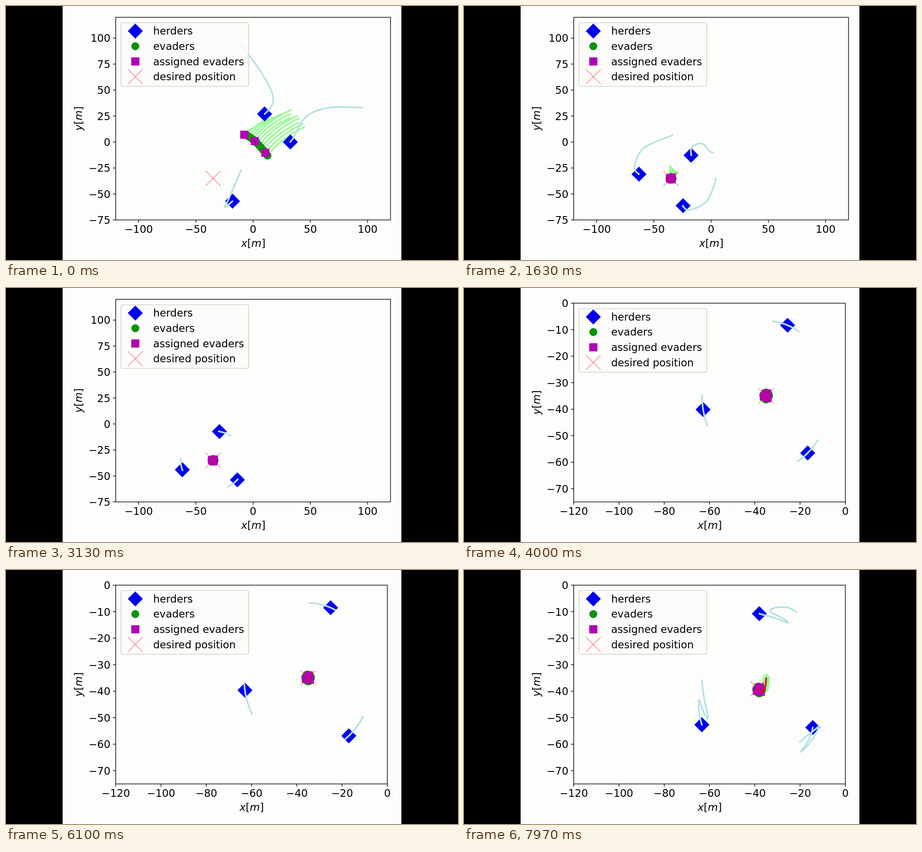
An HTML page with a canvas that plays this animation: 998 by 561 pixels, repeating every 8 s.

```html
<!DOCTYPE html>
<html lang="en">
<head>
<meta charset="utf-8">
<title>Herding</title>
<style>
  html, body { margin: 0; width: 100%; height: 100%; overflow: hidden; background: #000; }
  canvas { display: block; }
</style>
</head>
<body>
<canvas id="stage" width="998" height="561"></canvas>
<script>
const ctx = document.getElementById('stage').getContext('2d');
const LOOP = 8000, STEP = 100 / 3, TRAIL = 1000;
const SETTLED = 1630, ZOOM_AT = 3670, GOAL_MOVES = 7100;
const PAPER = '#fdfdfb', BLUE = '#0000f0', GREEN = '#0a930a', PURPLE = '#b000b4';
const FONT = '22.9px "DejaVu Sans", sans-serif';
const LEFT = 242.3, BOTTOM = 472.5;

const range = (a, b, step) => Array.from({ length: (b - a) / step + 1 }, (_, i) => a + i * step);
const mix = (a, b, u) => [a[0] + (b[0] - a[0]) * u, a[1] + (b[1] - a[1]) * u];
const clamp = u => Math.min(1, Math.max(0, u));
const wave = (t, period) => Math.sin(2 * Math.PI * t / period);
const polar = (c, r, a) => [c[0] + r * Math.cos(a), c[1] + r * Math.sin(a)];

// Axes: frame edges, data limits and ticks, with a map from data to pixels.
function makeAxes(right, top, xMax, yMax, xTicks, yTicks) {
  const sx = (right - LEFT) / (xMax + 120), sy = (BOTTOM - top) / (yMax + 75);
  return { right, top, xTicks, yTicks, px: ([x, y]) => [LEFT + (x + 120) * sx, BOTTOM - (y + 75) * sy] };
}
const wide = makeAxes(849, 25, 120, 120, range(-100, 100, 50), range(-75, 100, 25));
const near = makeAxes(842, 33.5, 0, 0, range(-120, 0, 20), range(-70, 0, 10));

// The goal rests, then hooks down and to the left.
function goal(t) {
  const u = clamp((t - GOAL_MOVES) / (LOOP - STEP - GOAL_MOVES));
  return [-35 - 3.6 * u * u, -35 - 5.2 * Math.sin(2.25 * u)];
}

// Smooth curve through points evenly spaced in time (Catmull-Rom).
function curve(points, t0, t1) {
  const last = points.length - 1;
  const at = i => points[Math.min(last, Math.max(0, i))];
  return t => {
    const s = clamp((t - t0) / (t1 - t0)) * last;
    const i = Math.min(last - 1, Math.floor(s)), u = s - i;
    return [0, 1].map(n => {
      const [a, b, c, d] = [at(i - 1)[n], at(i)[n], at(i + 1)[n], at(i + 2)[n]];
      return b + u / 2 * (c - a + u * (2 * a - 5 * b + 4 * c - d + u * (3 * (b - c) + d - a)));
    });
  };
}

// Once settled, the herders swing together on a ring around the goal.
function ring(slot, t) {
  const catchUp = 38 * Math.exp((SETTLED - t) / 500);
  const degrees = 75 + 4 * wave(t - 4000, 3300) + 11 * wave(t - 2897, 706) - catchUp;
  return polar(goal(t), 28.3, (degrees + slot * 120) * Math.PI / 180);
}

function makeHerder(slot, points) {
  const chase = curve(points, -978, SETTLED);
  return t => t < SETTLED ? chase(t) : ring(slot, t);
}

const herders = [
  makeHerder(1, [[-11, 94], [6.5, 68], [17.5, 43], [10, 27], [-12, 16], [-35, 6], [-59, -6], [-67, -24], [-63, -31]]),
  makeHerder(0, [[95, 33], [66, 33], [46, 24], [32.5, 0], [18, -9], [1, -10], [-8, -1.5], [-17, -5], [-17.3, -13]]),
  makeHerder(2, [[-10.5, -27], [-21, -54], [-25, -63], [-18, -57], [-6, -46], [4, -35], [-4, -57], [-19, -65.5], [-25, -61.5]])
];

// Evaders: swept in a slanted line, then gathered tightly on the goal.
let seed = 7;
const random = () => (seed = seed * 16807 % 2147483647) / 2147483647;

const evaders = range(0, 11, 1).map(k => {
  const u = k / 11;
  const front = [-7.7 + 20.2 * u, 7 - 20 * u ** 1.5];
  const reach = Math.min(1, .3 + 2.5 * u) * (.75 + .35 * random());
  const from = [front[0] + 33 * reach, front[1] + 28 * reach];
  const bend = [front[0] + 13 * reach, front[1] + 18 * reach];
  const arrive = [-32.7 + 7 * (u - .5), -26.5 - 7 * (u - .5)];
  const angle = Math.PI / 3 + k * Math.PI * 8 / 15;
  const crowd = t => polar(goal(t - 60), k % 5 ? 1.3 : 1, angle + .3 * wave(t, 1900));
  return t => {
    if (t < 0) {
      const s = 1 + t / TRAIL;
      return mix(mix(from, bend, s), mix(bend, front, s), s);
    }
    if (t < 630) return mix(front, arrive, t / 630);
    return mix(arrive, crowd(t), clamp((t - 630) / 370));
  };
});
const isAssigned = (_, k) => k % 5 === 0;
const assigned = evaders.filter(isAssigned);
const free = evaders.filter((e, k) => !isAssigned(e, k));

function poly(points, color, width) {
  ctx.beginPath();
  for (const p of points) ctx.lineTo(...p);
  ctx.strokeStyle = color;
  ctx.lineWidth = width;
  ctx.stroke();
}

function trail(ax, path, t, from, color) {
  const points = [];
  for (let s = t; s >= from - 1; s -= STEP / 2) points.push(ax.px(path(s)));
  poly(points, color, 3.6);
}

const marks = {
  diamond([x, y]) {
    const r = 16.6;
    ctx.fillStyle = BLUE;
    ctx.beginPath();
    for (const [dx, dy] of [[0, -r], [r, 0], [0, r], [-r, 0]]) ctx.lineTo(x + dx, y + dy);
    ctx.fill();
  },
  dot([x, y]) {
    ctx.fillStyle = GREEN;
    ctx.beginPath();
    ctx.arc(x, y, 8.8, 0, 2 * Math.PI);
    ctx.fill();
  },
  square([x, y]) {
    ctx.fillStyle = PURPLE;
    ctx.fillRect(x - 9, y - 9, 18, 18);
  },
  cross([x, y]) {
    const r = 16.3, color = 'rgba(235,30,40,.4)';
    poly([[x - r, y - r], [x + r, y + r]], color, 2);
    poly([[x - r, y + r], [x + r, y - r]], color, 2);
  }
};

function label(text, x, y, align, style = '') {
  ctx.font = style + FONT;
  ctx.textAlign = align;
  ctx.fillStyle = '#000';
  ctx.fillText(text, x, y);
}

function axisLabel(letter, x, y, angle) {
  ctx.save();
  ctx.translate(x, y);
  ctx.rotate(angle);
  let at = -26.5;
  for (const s of [letter, '[', 'm', ']']) {
    label(s, at, 0, 'left', /\w/.test(s) ? 'italic ' : '');
    at += ctx.measureText(s).width;
  }
  ctx.restore();
}

const tickText = n => String(n).replace('-', '\u2212');

function drawAxes(ax) {
  for (const n of ax.xTicks) {
    const x = ax.px([n, 0])[0];
    poly([[x, BOTTOM], [x, BOTTOM + 6]], '#000', 1.4);
    label(tickText(n), x, 501, 'center');
  }
  for (const n of ax.yTicks) {
    const y = ax.px([0, n])[1];
    poly([[LEFT - 6, y], [LEFT, y]], '#000', 1.4);
    label(tickText(n), 230.5, y + 8.5, 'right');
  }
  ctx.strokeRect(LEFT, ax.top, ax.right - LEFT, BOTTOM - ax.top);
  axisLabel('x', (LEFT + ax.right) / 2, 532, 0);
  axisLabel('y', 167.5, (ax.top + BOTTOM) / 2, -Math.PI / 2);
}

function drawLegend(top) {
  ctx.beginPath();
  ctx.roundRect(254, top, 282, 140.5, 4);
  ctx.fillStyle = 'rgba(253,253,251,.8)';
  ctx.fill();
  ctx.strokeStyle = '#d2d2c8';
  ctx.lineWidth = 1.6;
  ctx.stroke();
  const rows = { diamond: 'herders', dot: 'evaders', square: 'assigned evaders', cross: 'desired position' };
  Object.entries(rows).forEach(([mark, text], i) => {
    const y = top + 18.3 + i * 33.6;
    marks[mark]([285.5, y]);
    label(text, 325, y + 8, 'left');
  });
}

function draw(t) {
  const ax = t < ZOOM_AT ? wide : near;
  const mark = (kind, paths) => paths.forEach(path => marks[kind](ax.px(path(t))));
  ctx.fillStyle = '#000';
  ctx.fillRect(0, 0, 998, 561);
  ctx.fillStyle = PAPER;
  ctx.fillRect(125, 0, 748, 561);

  ctx.save();
  ctx.beginPath();
  ctx.rect(LEFT, ax.top, ax.right - LEFT, BOTTOM - ax.top);
  ctx.clip();
  ctx.lineJoin = ctx.lineCap = 'round';
  for (const e of evaders) trail(ax, e, t, t - TRAIL, '#98fb98');
  mark('dot', free);
  mark('square', assigned);
  mark('cross', [goal]);
  mark('diamond', herders);
  for (const h of herders) trail(ax, h, t, t - TRAIL, '#b4e2e6');
  if (t > GOAL_MOVES) trail(ax, goal, t, GOAL_MOVES, '#e8101c');
  ctx.restore();

  drawAxes(ax);
  drawLegend(ax.top + 12);
}

const start = performance.now();
function tick() {
  const t = (performance.now() - start) % LOOP;
  draw(Math.floor((t + 4) / STEP) * STEP);
  requestAnimationFrame(tick);
}
tick();
</script>
</body>
</html>
```
